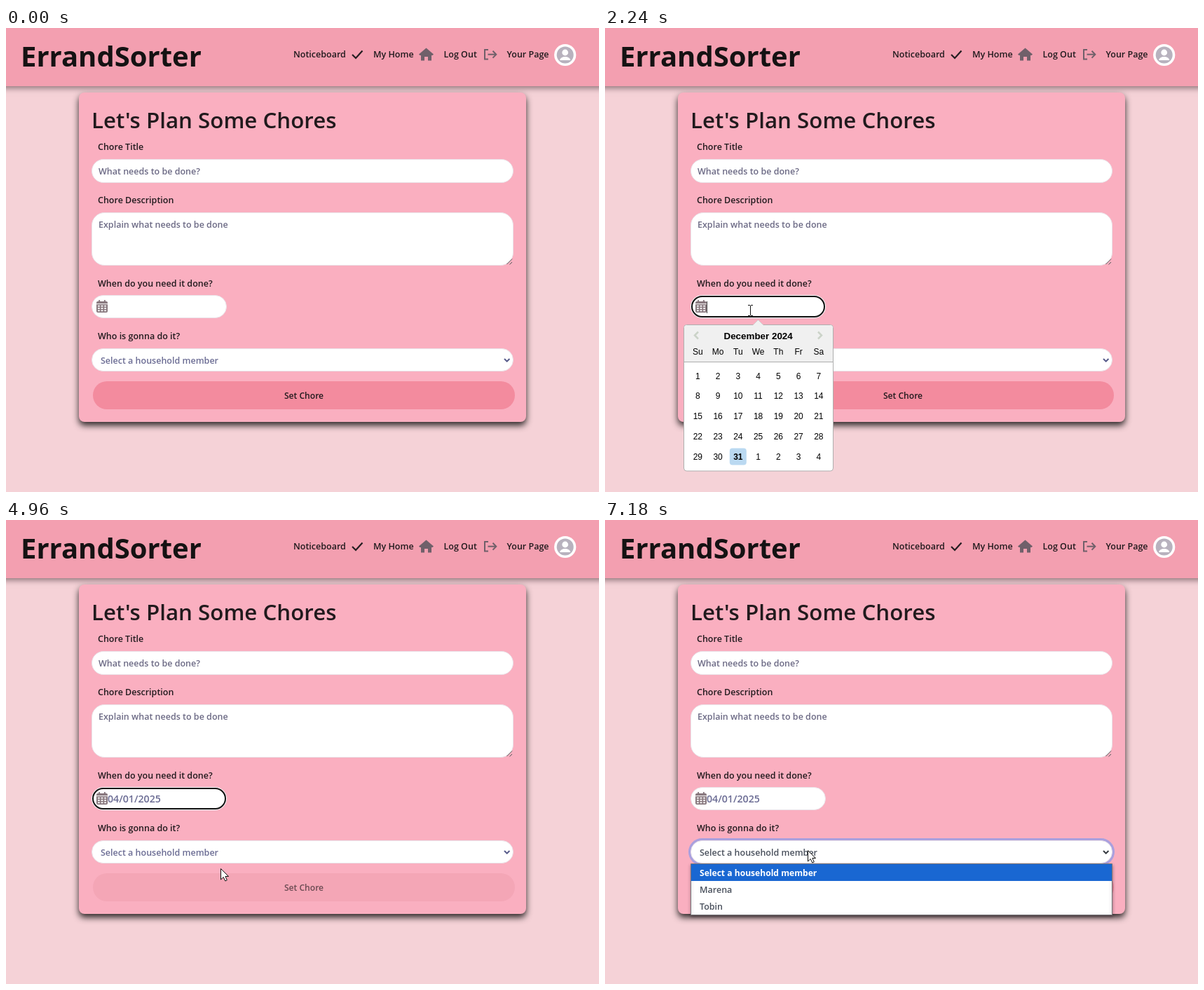
Write an HTML page with a canvas that moves like this. It is 846 px wide and 662 px high and loops after 8000 ms.

```html
<!DOCTYPE html>
<html lang="en">
<head>
<meta charset="utf-8">
<title>Chores</title>
<style>
html, body { margin: 0; width: 100%; height: 100%; overflow: hidden; background: #f5d2d7; }
canvas { display: block; }
</style>
</head>
<body>
<canvas id="stage" width="846" height="662"></canvas>
<script>
const ctx = document.getElementById('stage').getContext('2d');
const LOOP = 8000;
const UI = '"Open Sans", "Noto Sans", sans-serif';
const CAL = '"Liberation Sans", Arial, sans-serif';
const INK = '#211a1d', HINT = '#6c6a85', BLUE = [107, 108, 148], GREY = [73, 80, 92];
const BUTTON = [243, 139, 158], BUTTON_HOVER = [244, 166, 182];

// Pointer moves: start, end, number of steps, points to pass.
const MOVES = [
  [130, 910, 12, [860, 705], [715, 545], [520, 345], [352, 254], [265, 268], [216, 294], [202.5, 301.5]],
  [980, 980, 1, [201, 298.5]],
  [1250, 1380, 3, [200.5, 301.5]],
  [1520, 1710, 4, [207.5, 402.5]],
  [2440, 3210, 12, [285.5, 611]],
  [3280, 3280, 1, [286, 612]],
  [3480, 3890, 6, [301, 613]],
  [4750, 5100, 6, [305, 555], [306, 497], [305, 467]],
  [5780, 6110, 6, [288, 457]],
  [6380, 6450, 2, [286, 459]],
  [6720, 6850, 3, [287, 468]],
  [7180, 7180, 1, [289, 471]]
];
const CLICKS = [[2050, 2240], [4160, 4220], [5370, 5780]];

const ARROW = new Path2D('M0 0V15.5L3.7 12L6.3 17.5L8.8 16.4L6.4 11H11Z');
const HAND = new Path2D('M-2 1.5Q-2 0 0 0T2 1.5V7Q3 6 4.5 7Q6 6.5 7 8Q9.5 7.5 10 9.5V13Q9.5 16 8 17.5V20H-1V17.5L-5 12Q-6 10 -4 9.5L-2 11Z');

const within = (t, a, b) => t >= a && t < b;
const ramp = (t, a, b) => Math.min(1, Math.max(0, (t - a) / (b - a)));
const inBox = (p, x, y, w, h) => within(p[0], x, x + w) && within(p[1], y, y + h);
const mix = (a, b, f) => a.map((v, i) => v + (b[i] - v) * f);
const rgb = c => `rgb(${c.map(Math.round)})`;

function text(s, x, y, { size = 12.5, weight = 600, color = INK, align = 'left', family = UI } = {}) {
  ctx.font = `${weight} ${size}px ${family}`;
  ctx.textAlign = align;
  ctx.fillStyle = color;
  ctx.fillText(s, x, y);
}

function box(x, y, w, h, r, fill, stroke, line = 1) {
  ctx.beginPath();
  ctx.roundRect(x, y, w, h, r);
  if (fill) { ctx.fillStyle = fill; ctx.fill(); }
  if (stroke) { ctx.strokeStyle = stroke; ctx.lineWidth = line; ctx.stroke(); }
}

function disc(x, y, r, fill) {
  ctx.beginPath();
  ctx.arc(x, y, r, 0, 7);
  ctx.fillStyle = fill;
  ctx.fill();
}

function line(points, color, width = 1) {
  ctx.beginPath();
  points.forEach(p => ctx.lineTo(...p));
  ctx.strokeStyle = color;
  ctx.lineWidth = width;
  ctx.stroke();
}

function withShadow(color, blur, y, draw) {
  ctx.save();
  ctx.shadowColor = color;
  ctx.shadowBlur = blur;
  ctx.shadowOffsetY = y;
  draw();
  ctx.restore();
}

const field = (x, y, w, h, r) => box(x + .5, y + .5, w - 1, h - 1, r, '#fff', '#eae2e8');

function pointer(t) {
  if (t < MOVES[0][0]) return null;
  let pos = MOVES[0][3];
  for (const [start, end, steps, ...stops] of MOVES) {
    if (t < start) break;
    const path = [pos, ...stops];
    const gap = (end - start) / (steps - 1 || 1) || 1;
    const k = Math.min(steps, Math.floor((t - start) / gap + .001) + 1);
    const at = k / steps * (path.length - 1);
    const i = Math.min(path.length - 2, Math.floor(at));
    pos = mix(path[i], path[i + 1], at - i);
  }
  return pos;
}

function drawHeader() {
  withShadow('rgba(40,25,30,.5)', 8, 3, () => box(-20, -20, 886, 103, 0, '#f39fb0'));
  text('ErrandSorter', 21, 55, { size: 40, weight: 700, color: '#151213' });
  text('Noticeboard', 410, 42);
  text('My Home', 524, 42);
  text('Log Out', 624.5, 42);
  text('Your Page', 714.5, 42);

  line([[494, 38], [499, 43], [508.5, 32.5]], '#231d20', 2.2);

  const grey = '#70606a';
  ctx.fillStyle = grey;
  ctx.fill(new Path2D('M599.5 28.5L610 37.5L608.5 39H607V46.5H602V41H597V46.5H592V39H590.5L589 37.5Z'));
  line([[688, 31], [683, 31], [683, 44.5], [688, 44.5]], grey, 2);
  line([[687.5, 37.7], [699, 37.7]], grey, 2);
  line([[694.5, 32.8], [699.3, 37.7], [694.5, 42.6]], grey, 2);

  disc(797.7, 38.5, 15.6, '#fff');
  disc(797.7, 38.5, 12, '#b8b2be');
  disc(797.7, 35, 4.4, '#fff');
  ctx.beginPath();
  ctx.ellipse(797.7, 46, 7.5, 5, 0, Math.PI, 0);
  ctx.fill();
}

function drawCalendarIcon() {
  const c = '#89797f';
  box(129, 390, 16, 16, 2, c);
  box(132, 388, 2.2, 4, 1, c);
  box(139.8, 388, 2.2, 4, 1, c);
  ctx.fillStyle = '#fff';
  ctx.fillRect(129, 393.2, 16, 1);
  for (let i = 0; i < 9; i++) {
    ctx.fillRect(131 + i % 3 * 4.6, 395.8 + Math.floor(i / 3) * 3.3, 2.8, 1.8);
  }
}

function drawForm(t) {
  withShadow('rgba(0,0,0,.82)', 10, 5, () => box(104, 92, 638, 470, 8, '#faafc0'));
  text("Let's Plan Some Chores", 122, 143, { size: 31.3 });
  text('Chore Title', 131, 174);
  text('Chore Description', 131, 249.5);
  text('When do you need it done?', 131, 368.5);
  text('Who is gonna do it?', 131, 443.5);

  field(122, 187, 602, 34, 17);
  text('What needs to be done?', 132, 209, { color: HINT });
  field(122, 263, 602, 76, 18);
  text('Explain what needs to be done', 132, 284.5, { color: HINT });
  line([[714.5, 337], [722, 329.5]], '#555');
  line([[718.5, 337.5], [722, 334]], '#555');

  field(122, 381, 193, 33, 16.5);
  if (within(t, 2050, 5370)) {
    box(122.5, 381.5, 192, 32, 16, null, '#fff');
    box(124, 383, 189, 29, 14.5, null, '#111', 2);
  }
  drawCalendarIcon();
  if (t >= 4220) text('04/01/2025', 145, 403, { size: 14.2, color: rgb(BLUE) });
  if (within(t, 2100, 5370) && (t - 2100) % 1060 < 530) {
    ctx.fillStyle = '#444';
    ctx.fillRect(145, 390, 1, 17);
  }

  const fade = Math.min(ramp(t, 4780, 4950), 1 - ramp(t, 4980, 5160));
  box(124, 504, 602, 40, 20, rgb(mix(BUTTON, BUTTON_HOVER, fade)));
  ctx.globalAlpha = 1 - .35 * fade;
  text('Set Chore', 425, 528.5, { size: 12.1, align: 'center' });
  ctx.globalAlpha = 1;

  drawSelect(t);
}

function drawSelect(t) {
  const glow = ramp(t, 5425, 5510);
  if (glow) {
    ctx.globalAlpha = glow;
    box(119, 454, 608, 39, 19.5, '#aaa0de');
    ctx.globalAlpha = 1;
  }
  field(122, 457, 602, 33, 16.5);
  const tone = rgb(mix(BLUE, GREY, ramp(t, 5370, 5450)));
  text('Select a household member', 135, 479, { color: tone });
  line([[711, 472], [714.7, 475.7], [718.4, 472]], t < 5400 ? '#565a8a' : '#343a40', 2);

  if (t < 5440) return;
  withShadow('rgba(40,25,32,.4)', 4, 2, () => box(122.5, 490.5, 601, 73, 0, '#fff', '#77767a'));
  ctx.fillStyle = '#1967d2';
  ctx.fillRect(123, 491, 600, 24);
  text('Select a household member', 135, 508, { weight: 700, color: '#fff', size: 12.1 });
  text('Marena', 135, 532, { color: rgb(GREY) });
  text('Tobin', 135, 556, { color: rgb(GREY) });
}

const DAY = 28.75, FIRST = [132.3, 496.5];
const cell = i => [FIRST[0] + DAY * (i % 7), FIRST[1] + DAY * Math.floor(i / 7)];
const overDay = (p, i) => {
  const [x, y] = cell(i);
  return inBox(p, x - 12, y - 12, 24, 24);
};
const hoveredDay = p => Array.from({ length: 35 }, (_, i) => i).findIndex(i => overDay(p, i));

function drawCalendar(hover) {
  const edge = '#aeaeae';
  box(112.5, 423.5, 213, 208.5, 4, '#fff', edge);
  box(113, 424, 212, 52.5, [4, 4, 0, 0], '#f0f0f0');
  line([[113, 476.5], [325, 476.5]], edge);
  line([[211, 424], [218.5, 416.5], [226, 424]], edge);
  ctx.fillStyle = '#f0f0f0';
  ctx.fill();

  const small = { size: 12, align: 'center', color: '#000', family: CAL, weight: 400 };
  text('December 2024', 218.6, 443.5, { ...small, size: 13.4, weight: 700 });
  line([[133, 433.5], [128, 438.5], [133, 443.5]], '#cbd3c8', 2.5);
  line([[304, 433.5], [309, 438.5], [304, 443.5]], '#cbd3c8', 2.5);
  ['Su', 'Mo', 'Tu', 'We', 'Th', 'Fr', 'Sa'].forEach((d, i) => text(d, cell(i)[0], 465.5, small));

  const hot = hoveredDay(hover);
  for (let i = 0; i < 35; i++) {
    const [x, y] = cell(i);
    const today = i === 30;
    if (today || i === hot) box(x - 12, y - 12, 24, 24, 4, today ? '#bad9f1' : '#f0f0f0');
    text(i % 31 + 1, x, y + 4, { ...small, weight: today ? 700 : 400 });
  }
}

function drawPointer(t, p, open) {
  if (CLICKS.some(c => within(t, ...c))) disc(p[0] - .5, p[1], 10.7, 'rgba(249,234,90,.72)');
  const onCalendar = open && inBox(p, 112, 423, 214, 210);
  const typing = !onCalendar && (inBox(p, 122, 187, 602, 34) ||
    inBox(p, 122, 263, 602, 76) || inBox(p, 122, 381, 193, 33));
  ctx.save();
  ctx.translate(Math.round(p[0]), Math.round(p[1]));
  if (typing) {
    ctx.fillStyle = '#111';
    ctx.fillRect(-1, -7, 1, 14);
    for (const y of [-8, 7]) {
      ctx.fillRect(-4, y, 3, 1);
      ctx.fillRect(0, y, 3, 1);
    }
  } else {
    const onButton = inBox(p, 124, 504, 602, 40);
    const shape = onButton || (onCalendar && hoveredDay(p) >= 0) ? HAND : ARROW;
    ctx.translate(.5, .5);
    ctx.fillStyle = '#fff';
    ctx.strokeStyle = '#111';
    ctx.lineWidth = 1;
    ctx.fill(shape);
    ctx.stroke(shape);
    if (shape === HAND) {
      for (const x of [2, 4.5, 7]) line([[x, 7.5], [x, 10.5]], '#111', .9);
    }
  }
  ctx.restore();
}

function draw(t) {
  ctx.fillStyle = '#f5d2d7';
  ctx.fillRect(0, 0, 846, 662);
  drawHeader();
  drawForm(t);
  const p = pointer(t);
  const open = within(t, 2110, 4220);
  if (open) drawCalendar(p);
  if (p) drawPointer(t, p, open);
}

const begin = performance.now();
function tick() {
  draw((performance.now() - begin) % LOOP);
  requestAnimationFrame(tick);
}
tick();
</script>
</body>
</html>
```
